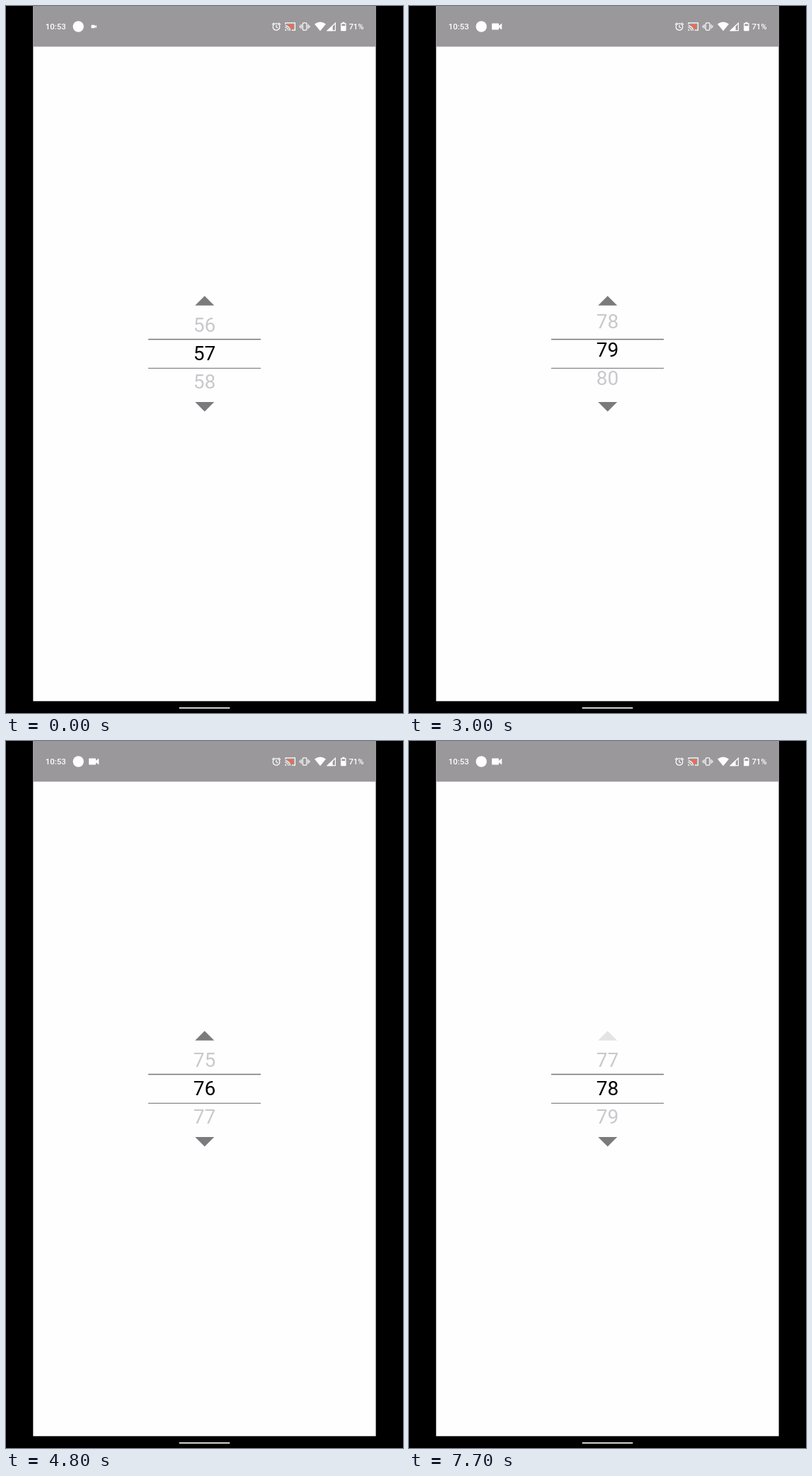
Recreate the animation shown at these times as an HTML page. Size 561 by 998 pixels, loop 8000 ms.

```html
<!DOCTYPE html>
<html lang="en">
<head>
<meta charset="utf-8">
<title>Number picker</title>
<style>
  html, body { margin: 0; width: 100%; height: 100%; overflow: hidden; background: #000; }
  svg { display: block; width: 561px; height: 998px; }
  text { font-family: Roboto, sans-serif; }
  .status text { font-size: 11.4px; font-weight: 500; }
  #column text { font-size: 28px; text-anchor: middle; }
  .line { fill: none; stroke: #fff; stroke-width: 1.2; }
  .paper { fill: #fffeff; }
  .arrow { fill: #7b7a7d; }
</style>
</head>
<body>
<svg viewBox="0 0 561 998">
  <defs>
    <g id="column"></g>
    <clipPath id="list"><rect x="201" y="430.5" width="159" height="120.5"/></clipPath>
    <clipPath id="band"><rect x="201" y="471" width="159" height="40"/></clipPath>
  </defs>

  <rect width="561" height="998"/>
  <rect class="paper" x="38.3" width="484.3" height="981.3"/>
  <rect x="38.3" width="484.3" height="57.4" fill="#9a989a"/>
  <rect x="244.5" y="990" width="72" height="1.7" rx=".8" fill="#eee"/>

  <g class="status" fill="#fff">
    <text x="55.7" y="33">10:53</text>
    <circle cx="102.2" cy="29" r="7.7"/>
    <path id="camera" d="M118 24.6h8q1 0 1 1v2.2l4.2-3.2v8.8l-4.2-3.2v2.2q0 1-1 1h-8q-1 0-1-1v-6.8q0-1 1-1z"/>

    <g class="line">
      <circle cx="382" cy="29.4" r="4.8"/>
      <path d="M382 26.4v3.3l2.4 1.4M376 26.2l2.9-2.6M388 26.2l-2.9-2.6"/>
    </g>

    <path d="M397.4 26h8.6v6.6h-3.2q-1-3.8-5.4-5z" fill="#ee6a50"/>
    <path class="line" d="M395 26v-2.2h13.4v10.4h-4.6M394.5 30.3a4.5 4.5 0 0 1 4.5 4.5M394.5 27.9a6.9 6.9 0 0 1 6.9 6.9"/>
    <path d="M394.4 32.7a2.1 2.1 0 0 1 2.1 2.1h-2.1z"/>

    <g class="line">
      <rect x="419.3" y="23.9" width="5.6" height="10.2" rx="1"/>
      <path d="M417.2 26v6M415.3 27.5v3M427 26v6M428.9 27.5v3"/>
    </g>

    <path d="M436 25.6q8-6 16 0l-8 9.6z"/>
    <path d="M461.6 27v8.2h-8.6z"/>
    <path class="line" d="M465.4 24.2v10.4h-11z"/>
    <path d="M475.2 22.8h3.2v1.3h1.4q.8 0 .8.8v9.6q0 .8-.8.8h-6q-.8 0-.8-.8v-9.6q0-.8.8-.8h1.4z"/>
    <path d="M474.3 25.4h5v2.6h-5z" fill="#9a989a"/>
    <text x="484.4" y="33">71%</text>
  </g>

  <g clip-path="url(#list)"><use class="numbers" href="#column" fill="#c9c8cc"/></g>
  <rect class="paper" x="201" y="471" width="159" height="40"/>
  <g clip-path="url(#band)"><use class="numbers" href="#column" fill="#000"/></g>
  <rect x="201" y="469.8" width="159" height="1.5" fill="#757477"/>
  <rect x="201" y="510.8" width="159" height="1.1" fill="#79787b"/>

  <path id="up" class="arrow" d="M267.2 422.7L280.7 409.2L294.2 422.7z"/>
  <path id="down" class="arrow" d="M267.2 559L280.7 572.5L294.2 559z"/>
</svg>
<script>
  const LOOP = 8000, STEP = 100, ROW = 40, FIRST = 54, LAST = 84;
  const $ = id => document.getElementById(id);
  const numbers = document.querySelectorAll('.numbers');

  for (let n = FIRST; n <= LAST; n++) {
    const label = document.createElementNS('http://www.w3.org/2000/svg', 'text');
    label.setAttribute('x', 280.6);
    label.setAttribute('y', 500.3 + (n - FIRST) * ROW);
    label.textContent = n;
    $('column').append(label);
  }

  const linear = u => u;
  const easeOut = u => Math.sin(u * Math.PI / 2);
  const easeInOut = u => (1 - Math.cos(u * Math.PI)) / 2;

  // Eased 0 to 1 between two times
  const ramp = (t, from, to, ease = linear) =>
    ease(Math.min(1, Math.max(0, (t - from) / (to - from))));

  // Fling up, drag back, creep under the finger, snap, then two taps
  function value(t) {
    return 57
      + 23 * ramp(t, 635, 1700, easeOut)
      - 3.325 * ramp(t, 2900, 3500, easeOut)
      - 0.175 * ramp(t, 3500, 4200)
      - 0.5 * ramp(t, 4200, 4800, easeInOut)
      + (t >= 6400) + (t >= 7100);
  }

  // Dims at once on press, fades back on release
  const touch = (t, press, release) =>
    t < press ? 1 : 0.2 + 0.8 * ramp(t, release - 50, release + 200);

  function draw(now) {
    const t = Math.floor(now % LOOP / STEP) * STEP;
    const y = (FIRST - value(t)) * ROW;
    numbers.forEach(el => el.setAttribute('transform', `translate(0 ${y})`));

    const size = 0.52 + 0.48 * ramp(t, 0, 200, easeOut);
    $('camera').setAttribute('transform',
      `translate(124.2 29) scale(${size}) translate(-124.2 -29)`);

    $('down').style.opacity = t < 6800 ? touch(t, 6100, 6400) : touch(t, 6800, 7100);
    $('up').style.opacity = touch(t, 7700, LOOP + 50);
  }

  const start = performance.now();
  function frame() {
    draw(performance.now() - start);
    requestAnimationFrame(frame);
  }
  frame();
</script>
</body>
</html>
```
